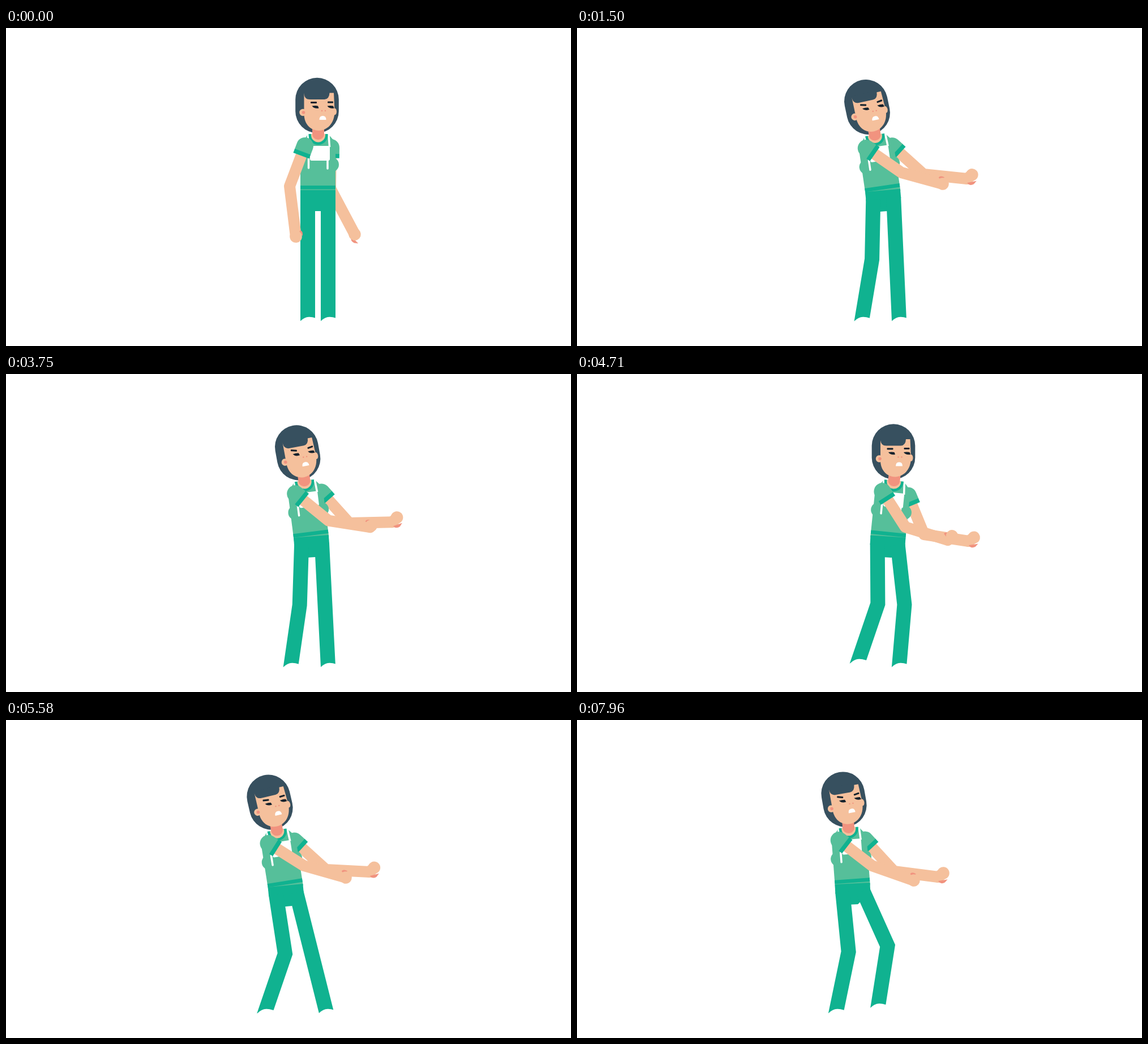
Recreate the animation shown at these times as an HTML page with a canvas. Size 998 by 561 pixels, loop 8 s.

```html
<!DOCTYPE html>
<html lang="en">
<head>
<meta charset="utf-8">
<title>Nurse pulling</title>
<style>
  html, body { margin: 0; height: 100%; overflow: hidden; background: #fff; }
  canvas { display: block; }
</style>
</head>
<body>
<canvas id="stage" width="998" height="561"></canvas>
<script>
const ctx = document.getElementById('stage').getContext('2d');
const LOOP = 8000, THIGH = 106, SHIN = 109.5, RAD = Math.PI / 180;
const C = { skin: '#f5c09c', coral: '#f1937f', hair: '#37505f', ink: '#13212c',
            shirt: '#56bf9a', pants: '#10b290', white: '#fff' };

// hip, lean | head, angle | near elbow, wrist | far elbow, wrist | near foot, far foot | reach, curl, frown
const stand = [551, 286, 0,  549.5, 136.5, 0,  501, 279, 512, 368,  573, 283, 616, 364,  533, 516, 569, 516,  0, 0, 0];
const back = [540, 286.5, -8.4,  512.5, 139.5, -12,  573, 255, 646, 275,  612, 258, 689, 266,  503, 516, 569, 516,  1, 0, 1];
const pull = [536.5, 286, -4.7,  521.5, 137.5, -6.5,  561, 267, 636, 259,  593, 275, 668, 250,  503, 516, 569, 516,  1, 1, 1];
const stepBack = [549.5, 286.5, 5.8,  559, 137, 0,  580, 270, 655, 293,  613, 283, 692, 295,  496, 509, 569, 516,  1, 1, 0];
const heave = [493.5, 292, -9,  466, 145, -13,  526, 257, 600, 278,  565, 264, 642, 268,  457.5, 516, 566, 516,  1, 0, .4];
const brace = [485.5, 289.5, -3.5,  475.5, 140, -4,  509, 270, 588, 270,  544, 279, 623, 262,  457.5, 516, 517, 516,  1, 1, 1];
const settle = [486.5, 288.5, -4.3,  471.5, 140, -10,  521, 257, 595, 283,  560, 267, 638, 277,  457.5, 516, 517, 516,  1, 0, 1];

const vary = (pose, changes) => Object.assign([...pose], changes);
const mix = (a, b, t, changes) => vary(a.map((v, i) => v + (b[i] - v) * t), changes);

const keys = [
  [0, stand], [800, stand], [1150, mix(stand, back, .5, { 15: 509 })],
  [1500, back], [1640, back], [2830, pull], [3300, back],
  [3730, mix(back, pull, .3)], [4130, back], [4710, stepBack],
  [5000, mix(stepBack, heave, .55)], [5580, heave],
  [5950, mix(heave, brace, .5, { 17: 507 })], [6330, brace],
  [6630, vary(settle, { 3: 469, 5: -11 })], [6960, settle], [7840, settle],
  [7960, vary(settle, { 16: 531.5, 17: 506.5 })], [LOOP, vary(settle, { 16: 531.5, 17: 506.5 })]
];

// Monotone cubic interpolation: smooth through the keys, still at turning points
function poseAt(time) {
  let k = 0;
  while (k < keys.length - 2 && time >= keys[k + 1][0]) k++;
  const slope = (j, i) => j < 0 || j > keys.length - 2 ? 0
    : (keys[j + 1][1][i] - keys[j][1][i]) / (keys[j + 1][0] - keys[j][0]);
  const tangent = (j, i) => {
    const a = slope(j - 1, i), b = slope(j, i);
    return a * b <= 0 ? 0 : 2 * a * b / (a + b);
  };
  const [t0, from] = keys[k], [t1, to] = keys[k + 1];
  const span = t1 - t0, u = (time - t0) / span, v = 1 - u;
  return from.map((p, i) => p * v * v * (1 + 2 * u) + to[i] * u * u * (3 - 2 * u)
    + span * u * v * (tangent(k, i) * v - tangent(k + 1, i) * u));
}

function rotate(x, y, angle) {
  const c = Math.cos(angle), s = Math.sin(angle);
  return [x * c - y * s, x * s + y * c];
}

function at(x, y, angle, draw) {
  ctx.save();
  ctx.translate(x, y);
  ctx.rotate(angle);
  draw();
  ctx.restore();
}

function fill(color, path) {
  ctx.fillStyle = color;
  ctx.fill(new Path2D(path));
}

function disc(color, x, y, rx, ry = rx) {
  ctx.fillStyle = color;
  ctx.beginPath();
  ctx.ellipse(x, y, rx, ry, 0, 0, 7);
  ctx.fill();
}

function box(color, x, y, w, h, r = 0) {
  ctx.fillStyle = color;
  ctx.beginPath();
  ctx.roundRect(x, y, w, h, r);
  ctx.fill();
}

function line(color, width, points, cap = 'butt', join = 'miter') {
  Object.assign(ctx, { strokeStyle: color, lineWidth: width, lineCap: cap, lineJoin: join });
  ctx.beginPath();
  points.forEach(p => ctx.lineTo(...p));
  ctx.stroke();
}

function leg(hip, x, y) {
  const dx = x - hip[0], dy = y - hip[1], d = Math.hypot(dx, dy);
  const along = d < THIGH + SHIN ? (THIGH ** 2 - SHIN ** 2 + d * d) / (2 * d) : d / 2;
  const bend = d < THIGH + SHIN ? Math.sqrt(Math.max(0, THIGH ** 2 - along ** 2)) : 0;
  const knee = [hip[0] + (dx * along + dy * bend) / d, hip[1] + (dy * along - dx * bend) / d];
  const reach = 1 + 7 / Math.hypot(x - knee[0], y - knee[1]);
  const end = [knee[0] + (x - knee[0]) * reach, knee[1] + (y - knee[1]) * reach];
  line(C.pants, 26, [hip, knee, end]);
  at(x, y, 0, () => fill(C.white, 'M-20 4L-13 1Q-6-6 2-6.3Q8-6.5 13-4.5L20-3V18H-20Z'));
}

function arm(shoulder, elbow, wrist, knuckle, curl, thumb) {
  const angle = Math.atan2(wrist[1] - elbow[1], wrist[0] - elbow[0]);
  line(C.skin, 20, [shoulder, elbow, wrist], 'round', 'round');
  at(...wrist, angle, () => {
    const [x, y] = knuckle.map(v => v * curl);
    line(C.skin, 20, [[0, 0], [x, y]], 'round');
    fill(C.coral, thumb);
    disc(C.skin, x, y, 10.8);
  });
  at(...shoulder, Math.atan2(elbow[1] - shoulder[1], elbow[0] - shoulder[0]), () => {
    box(C.shirt, -15, -15, 27, 30, [15, 0, 0, 15]);
    box(C.pants, 11, -15, 7.5, 30);
  });
}

function torso() {
  fill(C.shirt, 'M-31 5V-80L-18-98H19L31-84V5Z');
  disc(C.shirt, -22, -45, 13);
  disc(C.shirt, 24, -45, 13);
  box(C.pants, -31, -8, 62, 6.5);
  box(C.white, -14, -78, 35, 26, 3);
  line(C.white, 3.5, [[-16.5, -56], [-16.5, -39]], 'round');
  line(C.white, 3.5, [[17, -56], [17, -38]], 'round');
  line(C.white, 3.5, [[-17, -98], [-18, -88]]);
  line(C.white, 3.5, [[19, -98], [20.5, -76]]);
  fill(C.pants, 'M-16.5-99V-97A17 17 0 0 0 17.5-97V-99Z');
  fill(C.skin, 'M-12-99V-97A12.5 12.5 0 0 0 13-97V-99Z');
  box(C.coral, -10, -112, 21, 23, [0, 0, 10, 10]);
}

function face(frown) {
  disc(C.skin, 31, 11, 3.5, 6);
  disc(C.skin, -25, 12.5, 6.2);
  fill(C.skin, 'M-23-22H29.5L31 10C31 55-23 55-23 15Z');
  disc(C.coral, -24, 12.5, 2.8);
  fill(C.hair, 'M-24-24L-23-20Q-22-10.5-13-10.5H13Q21.5-11 22-22V-26Z');
  at(-6, -5, frown * 14 * RAD, () => box(C.ink, -5.5, -1.5, 11, 3, 1));
  at(23.5, -5.5, -frown * 10 * RAD, () => box(C.ink, -5, -1.5, 10, 3, 1));
  for (const x of [0, 27]) {
    at(x, 0, 0, () => fill(C.ink, 'M-9 1Q-3 0 1.5 1L3 5Q-5 6.5-9 1Z'));
  }
  disc(C.coral, 8.5, 9.5, 1.2);
  disc(C.coral, 14.5, 9.5, 1.2);
  fill(C.white, 'M4 25.5Q4 18.5 10 18.5Q16 18.5 16 25.5Z');
}

function draw(time) {
  const [hx, hy, leanDeg, headX, headY, headDeg, nex, ney, nwx, nwy, fex, fey, fwx, fwy,
         nearX, nearY, farX, farY, reach, curl, frown] = poseAt(time);
  const lean = leanDeg * RAD, pelvis = lean * .6, tilt = headDeg * RAD;
  const joint = (x, y, angle) => {
    const [dx, dy] = rotate(x, y, angle);
    return [hx + dx, hy + dy];
  };

  ctx.clearRect(0, 0, 998, 561);
  at(headX, headY, tilt, () => box(C.hair, -38.3, -48.7, 76.6, 97.4, 38.3));
  arm(joint(23 + 5 * reach, -75, lean), [fex, fey], [fwx, fwy], [8, -8], reach,
      'M1 7L17 2L13 8Q6 13 1 7Z');
  at(hx, hy, lean, torso);
  at(headX, headY, tilt, () => face(frown));
  at(hx, hy, pelvis, () => fill(C.pants, 'M-31 0H31V16L8 37H-8L-31 16Z'));
  leg(joint(18, 14, pelvis), farX, farY);
  leg(joint(-18, 14, pelvis), nearX, nearY);
  arm(joint(-23 + 5 * reach, -78, lean), [nex, ney], [nwx, nwy], [5, -9], curl,
      'M-10-9Q-8-14 0-12L-5-5Z');
}

function frame(now) {
  draw(now % LOOP);
  requestAnimationFrame(frame);
}
requestAnimationFrame(frame);
</script>
</body>
</html>
```
